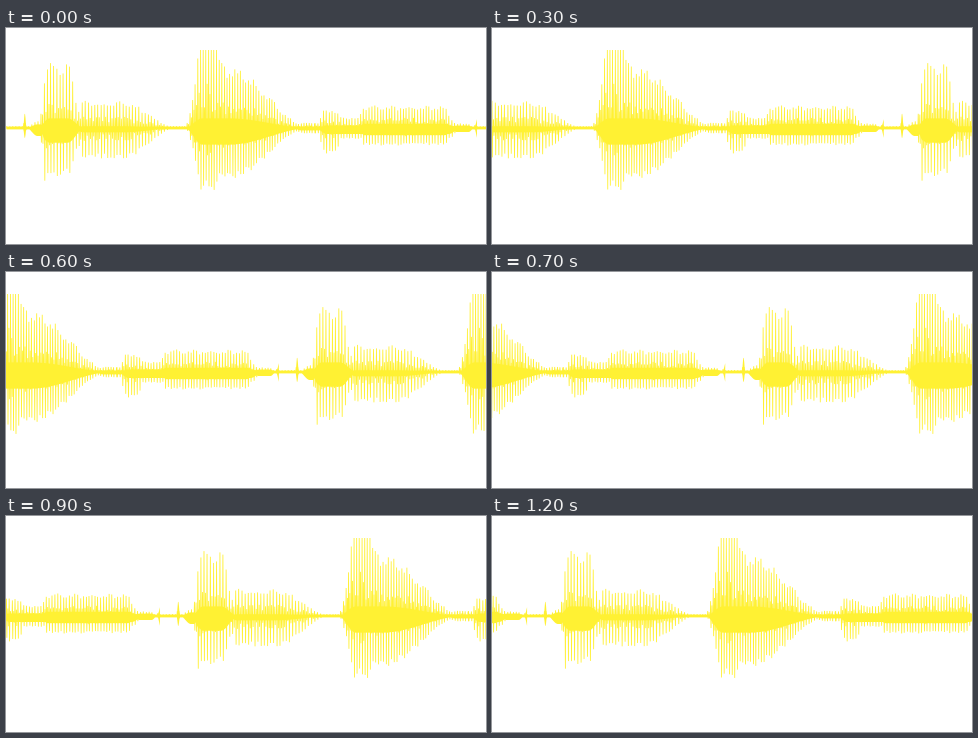
Animation of 480x216 px, one loop 1300 ms. Source, as a matplotlib script:

```python
import numpy as np
import matplotlib.pyplot as plt
from matplotlib.animation import FuncAnimation
from matplotlib.collections import PolyCollection

W, H, DPI = 480, 216, 100
MID = 99.5
CEILING = 77.5      # loudest upward swing before clipping
PERIOD = 470.5      # length of the repeating recording, px
STEP = 39.63        # scroll per tick, px
YELLOW = "#fff133"

# start, full, fade, end, height up, height down, solid share
SOUNDS = [
    (16.7, 18.2, 18.4, 20, 16, 10, 0.9),      # click
    (20, 31, 34, 40, 6, 8, 0.6),              # breath
    (33, 39, 40, 46, 52, 62, 0.1),            # first word
    (31, 43, 61, 78, 64, 49, 0.15),
    (66, 77, 116, 172, 25, 31, 0.07),
    (182, 195, 210, 222, 92, 63, 0),          # second word
    (178, 196, 222, 305, 60, 52, 0.16),
    (285, 295, 312, 325, 5, 6, 0.2),          # third word
    (309, 319, 327, 342, 18, 26, 0.1),
    (310, 320, 442, 455, 10, 12, 0.25),
    (350, 358, 438, 450, 21, 18, 0.2),
    (444, 450, 462, 468, 4, 4, 0.6),
    (467.5, 472, 474, 478, 13, 13, 0.9),      # closing burst
]
# Pulse spacing in each word: start, stop, gap
PITCH = [(0.5, 176, 3.15), (176, 309, 2.65), (309, PERIOD, 2.85)]

rng = np.random.default_rng(4)


def ease(t):
    return 0.5 - 0.5 * np.cos(np.pi * np.clip(t, 0, 1))


def loudness(x):
    """Heights up and down, then those of the solid centre band."""
    levels = np.ones((4,) + np.shape(x)) * 1.4
    for start, full, fade, end, up, down, solid in SOUNDS:
        gain = ease((x - start) / (full - start))
        gain = gain * ease((end - x) / (end - fade))
        peaks = (up, down, up * solid, down * min(1, 2 * solid))
        levels = np.maximum(levels, [gain * p for p in peaks])
    return levels


def spike(x, tip, base=0.75, end=0.42):
    return [(x - base, MID), (x - end, tip), (x + end, tip), (x + base, MID)]


def pulse(x, scale):
    up, down = loudness(x)[:2]
    ripple = 1 + 0.08 * np.cos(2 * np.pi * (x - 233) / 17)
    up *= scale * ripple * rng.uniform(0.84, 1)
    down *= scale * rng.uniform(0.84, 1)
    return [spike(x, MID - min(up, CEILING)), spike(x + 0.4, MID + down)]


def build_spikes():
    shapes = []
    for start, stop, gap in PITCH:
        for x in np.arange(start, stop, gap):
            x += rng.uniform(-0.2, 0.2)
            shapes += pulse(x, 1)
            shapes += pulse(x + 0.5 * gap, rng.uniform(0.2, 0.5))
    return np.array(shapes)


fig = plt.figure(figsize=(W / DPI, H / DPI), dpi=DPI, facecolor="white")
ax = fig.add_axes([0, 0, 1, 1])
ax.axis("off")

spikes = build_spikes()
xs = np.arange(0, PERIOD + 0.5, 0.5)
band_up, band_down = loudness(xs)[2:]
for tile in range(2):
    dx = tile * PERIOD
    ax.add_collection(PolyCollection(spikes + [dx, 0], facecolor=YELLOW,
                                     linewidth=0, snap=False))
    ax.fill_between(xs + dx, MID - band_up, MID + band_down, color=YELLOW,
                    linewidth=0, snap=False)
ax.set_ylim(H, 0)


def draw(i):
    shift = STEP * max(0, i - 1)    # the first pose holds for two ticks
    ax.set_xlim(shift, shift + W)
    return []


anim = FuncAnimation(fig, draw, frames=13, interval=100, repeat=True)
plt.show()
```
